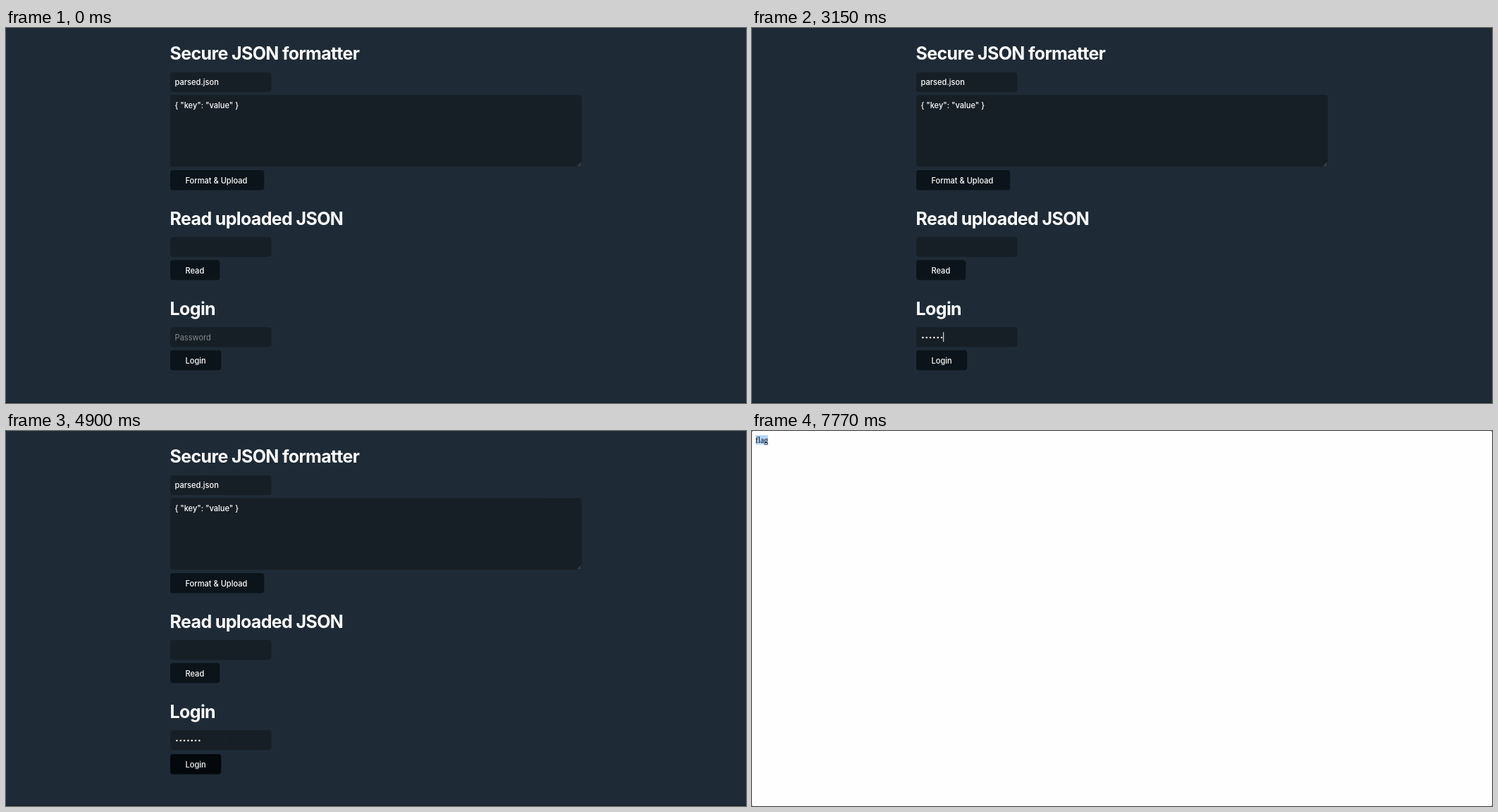
An HTML page for the animation above (7980 ms loop, 1050 by 533 pixels).

```html
<!DOCTYPE html>
<html lang="en">
<head>
<meta charset="utf-8">
<title>JSON formatter</title>
<style>
  html, body { margin: 0; width: 100%; height: 100%; overflow: hidden; background: #1e2b37; }
  svg { display: block; width: 100vw; height: 100vh; }
  text { font: 500 11.1px Inter, Roboto, sans-serif; letter-spacing: -.02px; fill: #fff; }
  .title { font-size: 25px; font-weight: 650; letter-spacing: -.65px; font-optical-sizing: none; }
  .field { fill: #171f26; }
  .button { fill: #0b141a; }
  .hint { font-weight: 400; fill: #858a8e; }
  .serif { font: 11.43px "Liberation Serif", "Times New Roman", serif; letter-spacing: 0; fill: #000; }

  .hint, .typed, .move, .caret, .press, .result, .mark {
    animation: 7980ms step-end infinite;
  }
  .hint { animation-name: hint; }
  .typed { animation-name: typed; }
  .move { animation-name: move; }
  .caret { animation-name: caret; }
  .press { animation-name: press; }
  .result { animation-name: result; }
  .mark { animation-name: mark; transform-origin: 5px 0; }
  .hover { animation: hover 7980ms linear infinite; }

  @keyframes hint { 0% { opacity: 1 } 26.31%, 100% { opacity: 0 } }
  @keyframes typed { 0% { opacity: 0 } 26.31%, 100% { opacity: 1 } }

  /* one 5.33px step per typed character */
  @keyframes move {
    0% { transform: translateX(0) }
    26.31% { transform: translateX(5.33px) }
    28.06% { transform: translateX(10.67px) }
    30.70% { transform: translateX(16px) }
    33.33% { transform: translateX(21.33px) }
    35.96% { transform: translateX(26.67px) }
    39.47% { transform: translateX(32px) }
    42.10%, 100% { transform: translateX(37.33px) }
  }
  @keyframes caret {
    0% { opacity: 0 }
    17.54% { opacity: 1 }
    23.68% { opacity: 0 }
    26.31% { opacity: 1 }
    48.24% { opacity: 0 }
    55.26% { opacity: 1 }
    58.77%, 100% { opacity: 0 }
  }
  @keyframes hover {
    0%, 55% { fill: #0b141a }
    56.8%, 100% { fill: #03080c }
  }
  @keyframes press {
    0% { transform: translateY(0) }
    58.77%, 100% { transform: translateY(1.3px) }
  }
  @keyframes result { 0% { opacity: 0 } 62.28%, 100% { opacity: 1 } }
  @keyframes mark {
    0% { transform: scaleX(0) }
    82.45% { transform: scaleX(.16) }
    83.33%, 100% { transform: scaleX(1) }
  }
</style>
</head>
<body>
<svg viewBox="0 0 1050 533" preserveAspectRatio="none">
  <rect width="1050" height="533" fill="#1e2b37"/>
  <rect y="532" width="1050" height="1" fill="#141d24"/>

  <text class="title" x="232.6" y="45">Secure JSON formatter</text>
  <rect class="field" x="233" y="63" width="143.5" height="28" rx="4"/>
  <text x="239.6" y="81">parsed.json</text>
  <rect class="field" x="233" y="95.3" width="584" height="102" rx="4"/>
  <text x="239.4" y="114">{ "key": "value" }</text>
  <path d="M811 196.5l5-5M814 196.5l2-2" stroke="#8b9094" stroke-width=".7"/>
  <rect class="button" x="233" y="202" width="133.3" height="28.4" rx="4"/>
  <text x="254.5" y="220.5">Format &amp; Upload</text>

  <text class="title" x="232.6" y="280">Read uploaded JSON</text>
  <rect class="field" x="233" y="297" width="143.5" height="28.3" rx="4"/>
  <rect class="button" x="233" y="329.8" width="70.4" height="28.4" rx="4"/>
  <text x="254.5" y="348.5">Read</text>

  <text class="title" x="232.6" y="408">Login</text>
  <rect class="field" x="233" y="425.2" width="143.5" height="28.2" rx="4"/>
  <text class="hint" x="239.6" y="443.5">Password</text>
  <g class="typed">
    <path d="M242.4 440h32.1" stroke="#fff" stroke-width="2.5" stroke-linecap="round" stroke-dasharray="0 5.33"/>
    <rect class="field move" x="239.8" y="434" width="42" height="12"/>
  </g>
  <g class="move"><rect class="caret" x="239.2" y="432.3" width="1" height="13.7" fill="#fff"/></g>
  <g class="press">
    <rect class="hover" x="233" y="458" width="72.3" height="28.4" rx="4"/>
    <text x="254.5" y="476.5">Login</text>
  </g>

  <g class="result">
    <rect width="1050" height="533" fill="#20262b"/>
    <rect width="1050" height="533" rx="1.6" fill="#fefefe"/>
    <rect class="mark" x="5" y="6" width="17.6" height="13.5" fill="#b3d7ff"/>
    <text class="serif" x="5" y="16.8">flag</text>
  </g>
</svg>
</body>
</html>
```
